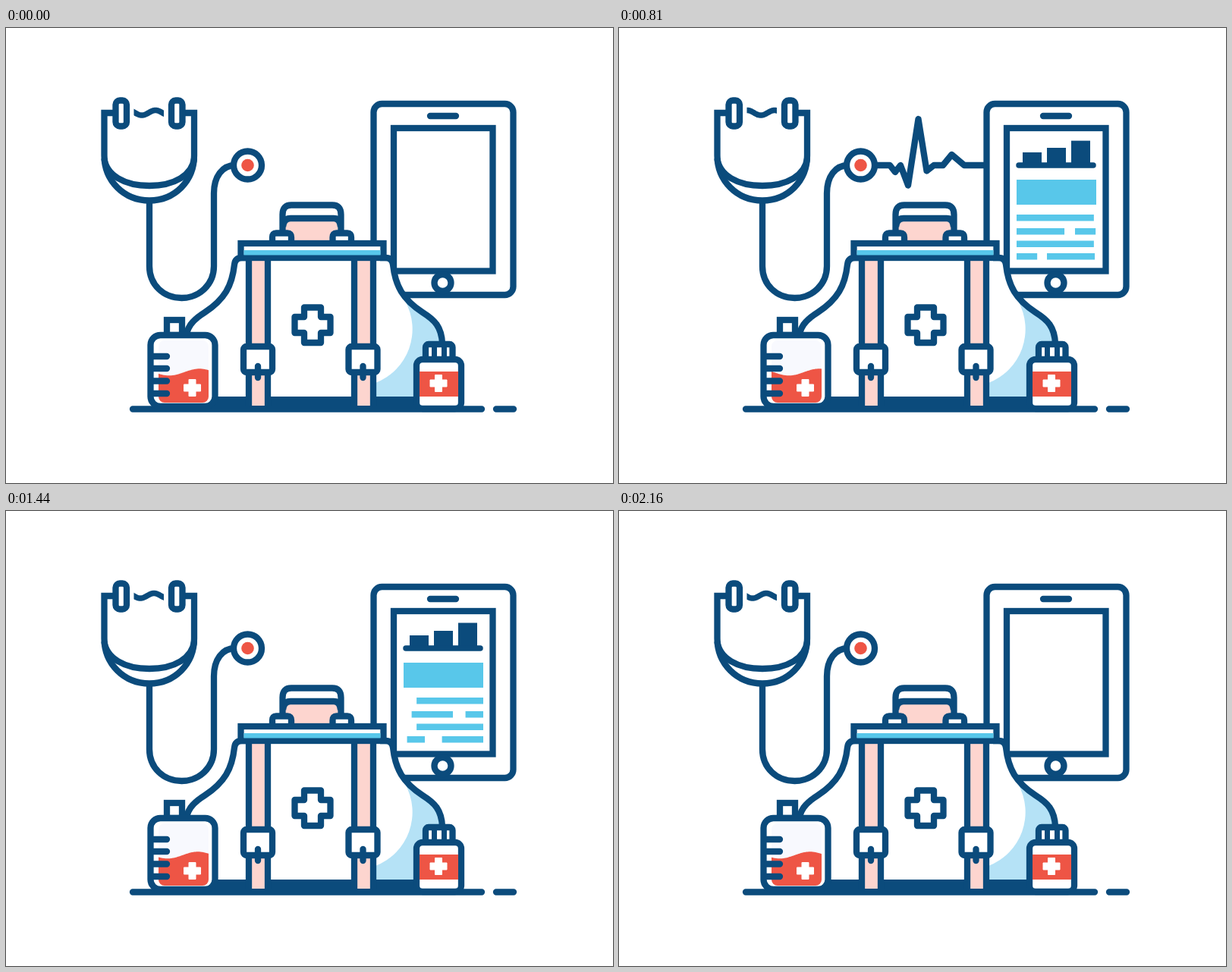
Recreate the animation shown at these times as an HTML page. Size 800 by 600 pixels, loop 2190 ms.

```html
<!DOCTYPE html>
<html lang="en">
<head>
<meta charset="utf-8">
<title>Medical kit</title>
<style>
  html, body { margin: 0; width: 100%; height: 100%; overflow: hidden; background: #fff; }
  svg { display: block; width: 100vw; height: 100vh; }
  .line { fill: none; stroke: #0b4b7c; stroke-width: 8.3; }
  .box { fill: #fff; }
  .round { stroke-linecap: round; stroke-linejoin: round; }
  .navy { fill: #0b4b7c; }
  .red { fill: #ee5545; }
  .pink { fill: #fdd5cf; }
  .cyan { fill: #58c7ea; }
  .white { fill: #fff; }
</style>
</head>
<body>
<svg viewBox="0 0 800 600">
  <defs>
    <clipPath id="stethWindow"><rect x="168.500" y="98" width="39.500" height="28"/></clipPath>
    <clipPath id="flask"><rect x="201" y="412" width="66" height="82" rx="8"/></clipPath>
    <path id="plus" class="white" d="M-4.500-11h9v6.500h6.500v9h-6.500v6.500h-9v-6.500h-6.500v-9h6.500z" stroke="#fff" stroke-linejoin="round"/>
    <g id="buckle">
      <rect class="line box" x="-19" y="420" width="38" height="34" rx="4"/>
      <path class="line round" d="M0 446V461"/>
    </g>
    <g id="strap">
      <rect class="pink" x="-9" y="306" width="18" height="192"/>
      <path class="line" d="M-12.500 306V498M12.500 306V498"/>
    </g>
    <path id="side" d="M318 303H311Q302 303 301 312C298 340 288 358 262 375C246 385 237 394 236 416"/>
    <g id="bagHalf">
      <path class="white" d="M406 303H311Q302 303 301 312C298 340 288 358 262 375C246 385 237 394 236 416V500H406Z"/>
    </g>
    <clipPath id="rightHalf"><path d="M493 303H500Q509 303 510 312C513 340 523 358 549 375C565 385 574 394 575 416V488H487V303Z"/></clipPath>
  </defs>

  <path id="pulse" class="line round" pathLength="100"
    d="M338 181H357L364 190L371 181L381 207.500L394.500 120L405.500 188.500L415 181H427L438.500 167L455 181H484"/>

  <!-- stethoscope -->
  <path class="line" d="M189 228V314C189 339 208 356 231.500 356S274 338 274 314V218C274 196 285 181 302 181"/>
  <path class="line box" d="M144 112H129.500V168C129.500 202 156 227.500 189 227.500S248 202 248 168V112H234"/>
  <path class="line" d="M129.500 172C132 194 156 208 189 208S245.500 194 248 172"/>
  <rect class="white" x="144" y="104" width="90" height="20"/>
  <g clip-path="url(#stethWindow)"><path id="ripple" class="line" style="stroke-width:7.500"/></g>
  <rect class="line box" x="144.500" y="95.500" width="14.500" height="34" rx="5.500"/>
  <rect class="line box" x="218" y="95.500" width="14.500" height="34" rx="5.500"/>
  <circle class="line box" cx="318.500" cy="181" r="18.500"/>
  <circle class="red" cx="318.500" cy="181" r="8.300"/>

  <!-- tablet -->
  <rect class="line box" x="484.500" y="100" width="184" height="252" rx="11"/>
  <rect class="line" x="511" y="132" width="130.500" height="188.500"/>
  <path class="line round" d="M559 116H593"/>
  <circle class="line box" cx="575.500" cy="336" r="11"/>
  <g id="bars" class="navy"></g>
  <path id="axis" class="line round" style="stroke-width:7.500"/>
  <rect id="panel" class="cyan" x="524" y="200" width="105"/>
  <g id="rows" class="cyan"></g>

  <!-- bag -->
  <use href="#bagHalf"/>
  <use href="#bagHalf" transform="matrix(-1 0 0 1 811 0)"/>
  <path clip-path="url(#rightHalf)" fill="#b5e2f6" d="M526 360A76 76 0 0 1 487 468V488H580V360Z"/>
  <use href="#side" class="line"/>
  <use href="#side" class="line" transform="matrix(-1 0 0 1 811 0)"/>
  <rect class="navy" x="268" y="486" width="280" height="16"/>
  <path class="line round" d="M167 502.500H627M646 502.500H669"/>
  <use href="#strap" x="332.500"/>
  <use href="#strap" x="471.500"/>
  <use href="#buckle" x="332"/>
  <use href="#buckle" x="470.500"/>
  <path class="line round box" d="M393 368.500H415V381H427.500V402H415V415H393V402H380.500V381H393Z"/>
  <path class="pink" d="M368 281V258Q368 252 376 252H432Q439 252 439 258V281Z"/>
  <path class="line" d="M364.500 272V246Q364.500 233.500 376 233.500H430Q441.500 233.500 441.500 246V272M365 262Q366 251 375 251H432Q440 251 441 262"/>
  <path class="line box" d="M351 284V276Q351 270.500 356 270.500H371Q376 270.500 376 276V284"/>
  <path class="line box" d="M430.500 284V276Q430.500 270.500 435.500 270.500H450Q455 270.500 455 276V284"/>
  <rect class="line box" x="309.500" y="284" width="188" height="19"/>
  <rect class="cyan" x="313.500" y="293" width="180" height="6.500"/>

  <!-- flask -->
  <rect class="line box" x="212" y="385" width="20" height="20"/>
  <rect class="line box" x="190.500" y="405" width="85" height="94" rx="13"/>
  <g clip-path="url(#flask)">
    <rect x="201" y="412" width="66" height="82" fill="#f8f9fe"/>
    <path id="liquid" class="red"/>
  </g>
  <path class="line round" d="M192 433H212M192 449H212M192 465.500H212M192 482H212"/>
  <use href="#plus" x="245.500" y="474.500"/>

  <!-- pill bottle -->
  <rect class="line box" x="553" y="417" width="35.500" height="24" rx="4"/>
  <path class="line" style="stroke-width:7" d="M564.500 417V437M577.500 417V437"/>
  <rect class="line box" x="541" y="437" width="59" height="65" rx="8"/>
  <rect class="red" x="545" y="453" width="51" height="33"/>
  <use href="#plus" x="570" y="468.500"/>
</svg>
<script>
const LOOP = 2190, STEP = 30;
const $ = id => document.getElementById(id);
const set = (el, attrs) => { for (const k in attrs) el.setAttribute(k, attrs[k]); };
const clamp = x => Math.min(1, Math.max(0, x));
const span = (t, from, to) => clamp((t - from) / (to - from));
const ease = x => x < .5 ? 2 * x * x : 1 - 2 * (1 - x) * (1 - x);
const eased = (t, from, to) => ease(span(t, from, to));

const addRects = (group, list) => list.map(item => {
  const el = document.createElementNS('http://www.w3.org/2000/svg', 'rect');
  $(group).append(el);
  return { el, ...item };
});

const bars = addRects('bars', [
  { x: 532, top: 164, rise: 555, fall: 1665 },
  { x: 564, top: 158, rise: 635, fall: 1630 },
  { x: 596, top: 147.5, rise: 715, fall: 1710 },
]);
const rows = addRects('rows', [
  { x: 524, y: 246, w: 105 },
  { x: 524, y: 264, w: 65 }, { x: 601, y: 264, w: 28 },
  { x: 524, y: 280.5, w: 105 },
  { x: 524, y: 297, w: 28 }, { x: 564, y: 297, w: 65 },
]);

// Sine curve from x0 to x1 whose crest lies at the given x
function wave(x0, x1, mid, amp, length, crest) {
  let d = '';
  for (let x = x0; x <= x1; x++) {
    const y = mid - amp * Math.cos((x - crest) / length * 2 * Math.PI);
    d += (d ? 'L' : 'M') + x + ' ' + y.toFixed(2);
  }
  return d;
}

function draw(t) {
  set($('ripple'), { d: wave(165, 212, 111.8, 3.3, 36, 197 + 36 * t * 6 / LOOP) });
  set($('liquid'), { d: wave(200, 268, 453.8, 4.5, 80, 255 + 80 * t * 3 / LOOP) + 'V495H200Z' });

  const head = 100 * span(t, 120, 540) ** 1.5;
  const tail = 100 * span(t, 790, 1210) ** 1.5;
  set($('pulse'), {
    'stroke-dasharray': `0 ${tail} ${head - tail} 200`,
    visibility: head > tail ? 'visible' : 'hidden',
  });

  const axisEnd = 527 + 98 * eased(t, 510, 640);
  const axisStart = 527 + 98 * eased(t, 1850, 2070);
  set($('axis'), {
    d: `M${axisStart} 181H${axisEnd}`,
    visibility: axisEnd > axisStart ? 'visible' : 'hidden',
  });

  for (const b of bars) {
    const h = (178 - b.top) * (eased(t, b.rise, b.rise + 110) - eased(t, b.fall, b.fall + 180));
    set(b.el, { x: b.x, y: 178 - h, width: 25, height: h });
  }

  set($('panel'), { height: 33 * (eased(t, 570, 770) - eased(t, 1470, 1680)) });

  const grow = eased(t, 595, 840), shrink = eased(t, 1370, 1615);
  for (const r of rows) {
    set(r.el, { x: r.x + r.w * shrink, y: r.y, width: r.w * (grow - shrink), height: 8.5 });
  }
}

const start = performance.now();
function tick() {
  const t = (performance.now() - start) % LOOP;
  draw(Math.floor(t / STEP) * STEP);
  requestAnimationFrame(tick);
}
tick();
</script>
</body>
</html>
```
